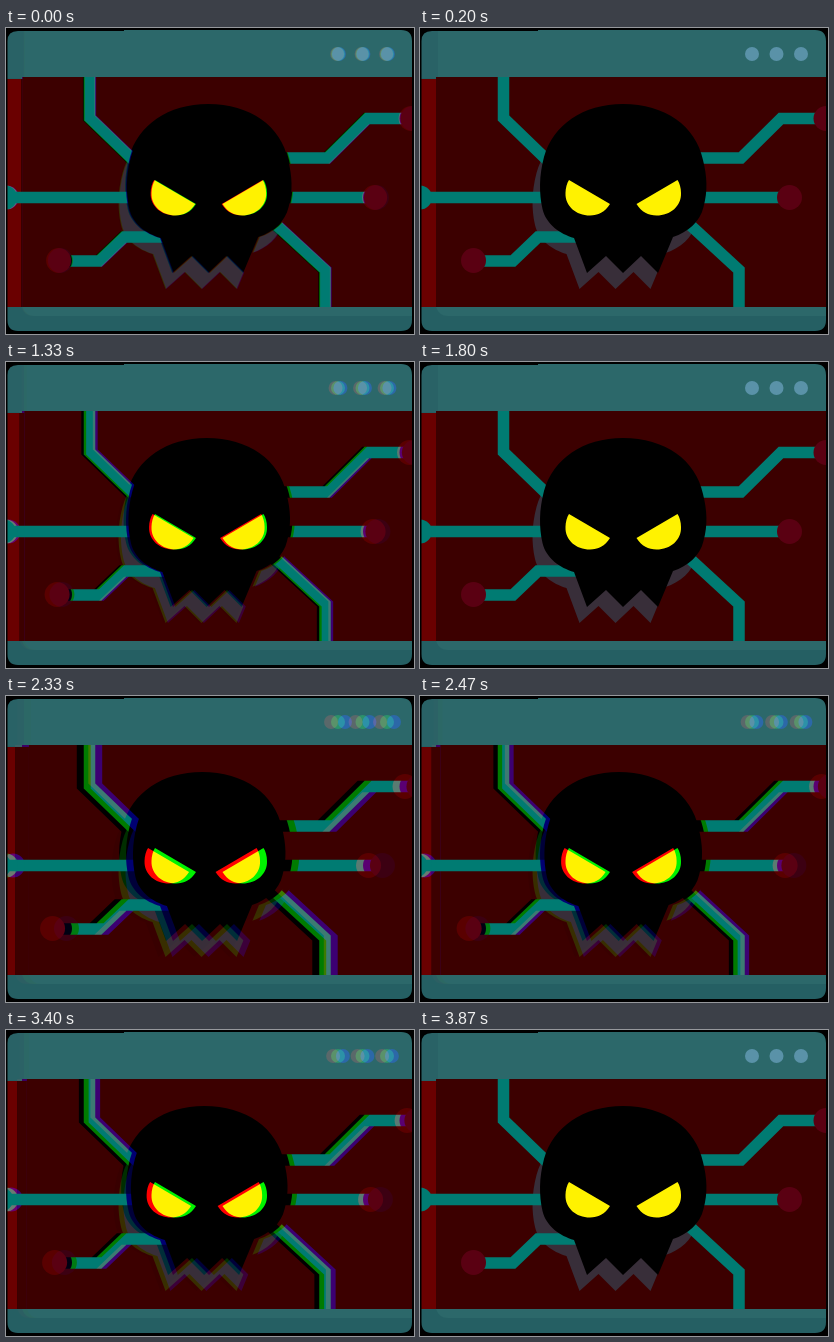
An HTML page for the animation above (3.99 s loop, 408 px wide and 306 px high).

```html
<!DOCTYPE html>
<html lang="en">
<head>
<meta charset="utf-8">
<title>Skull glitch</title>
<style>
  html, body { margin: 0; width: 100%; height: 100%; overflow: hidden; background: #000; }
  svg { display: block; width: 100vw; height: 100vh; }
  .channels { isolation: isolate; }
  .channels use { mix-blend-mode: screen; }
</style>
</head>
<body>
<svg viewBox="0 0 408 306">
  <defs>
    <g id="filters" color-interpolation-filters="sRGB">
      <filter id="r" filterUnits="userSpaceOnUse" x="-20" y="0" width="448" height="306">
        <feColorMatrix values="1 0 0 0 0  0 0 0 0 0  0 0 0 0 0  0 0 0 1 0"/>
        <feGaussianBlur stdDeviation=".5"/>
      </filter>
      <filter id="g" filterUnits="userSpaceOnUse" x="-20" y="0" width="448" height="306">
        <feColorMatrix values="0 0 0 0 0  0 1 0 0 0  0 0 0 0 0  0 0 0 1 0"/>
        <feGaussianBlur stdDeviation=".5"/>
      </filter>
      <filter id="b" filterUnits="userSpaceOnUse" x="-20" y="0" width="448" height="306">
        <feColorMatrix values="0 0 0 0 0  0 0 0 0 0  0 0 1 0 0  0 0 0 1 0"/>
        <feGaussianBlur stdDeviation=".5"/>
      </filter>
    </g>
    <clipPath id="window"><path d="M12 3H118V2H395Q406 2 406 13V292Q406 303 395 303H12Q1.5 303 1.5 292V13Q1.5 3 12 3Z"/></clipPath>
    <path id="skull" d="M203 76C245 76 276 98 283 132C287 148 288 163 283.5 179C280 194 268 204 253 209L238 245L221 228L203 245L186 228L167 245L154 210C140 206 126 196 122.5 181C119 165 119 148 124 129C133 97 163 76 203 76Z"/>
    <path id="eye" d="M149 152L190 176C185 184 178 187.5 170 187.5C156 187.5 145 178 145.5 165C145.5 160 147 155 149 152Z"/>
    <g id="scene">
      <path d="M-20 0H428V306H-20Z" fill="#255f63"/>
      <path d="M-20 0H428V49H-20ZM16 279H428V288H28Q19 288 16 279Z" fill="#2c686a"/>
      <path d="M-20 0H18V50H-20Z" fill="#296266"/>
      <path d="M-20 51H16V279H-20Z" fill="#6a0000"/>
      <path d="M16 49H428V279H16Z" fill="#3c0000"/>
      <g fill="#5a92a8">
        <circle cx="332" cy="26" r="7"/>
        <circle cx="356.5" cy="26" r="7"/>
        <circle cx="381" cy="26" r="7"/>
      </g>
      <use href="#skull" x="-7.5" y="16" fill="#382e39"/>
      <path d="M83.5 49V90L127 132M-20 169.5H125M60 233H93L118 209H156M280 130H321L361 90.5H400M280 169.5H362M268 195L319 242V279" fill="none" stroke="#007b72" stroke-width="11.5"/>
      <circle cx="0" cy="169.5" r="12" fill="#007b72"/>
      <g fill="#5a0012">
        <circle cx="53.5" cy="232.5" r="12.5"/>
        <circle cx="369.5" cy="169.5" r="12.5"/>
        <circle cx="406" cy="90.5" r="12.5"/>
      </g>
      <use href="#skull"/>
      <g fill="#fff200">
        <use href="#eye"/>
        <use href="#eye" transform="matrix(-1 0 0 1 406.5 0)"/>
      </g>
    </g>
  </defs>
  <g class="channels" clip-path="url(#window)">
    <use id="red" href="#scene" filter="url(#r)"/>
    <use href="#scene" filter="url(#g)"/>
    <use id="blue" href="#scene" filter="url(#b)"/>
  </g>
</svg>
<script>
  const LOOP = 3990, STEP = 66.5;
  const CYCLE = 16, ACTIVE = 12, LEAD = 2; // lengths in steps
  const SHIFT = 7.2, FLICKER = 2.783;
  const red = document.getElementById('red');
  const blue = document.getElementById('blue');

  // A quick flicker that swells and fades, followed by a short rest
  function splitAt(step) {
    const phase = (step + LEAD) % CYCLE;
    if (phase >= ACTIVE) return 0;
    const swell = Math.sin(Math.PI * phase / ACTIVE);
    return SHIFT * swell * Math.abs(Math.sin(Math.PI * (step - 3) / FLICKER));
  }

  function draw() {
    const split = splitAt(Math.floor(performance.now() % LOOP / STEP));
    red.setAttribute('transform', `translate(${-split} 0)`);
    blue.setAttribute('transform', `translate(${split} 0)`);
    requestAnimationFrame(draw);
  }
  draw();
</script>
</body>
</html>
```
